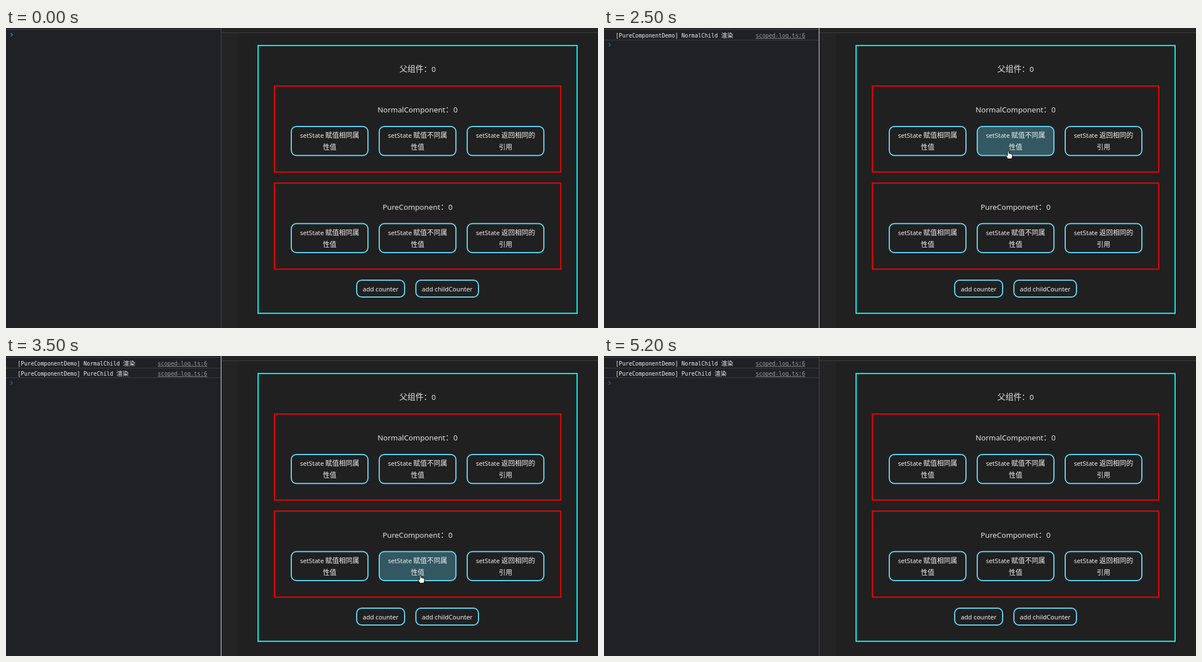
Animation, 1050 px wide and 533 px high, one loop 5300 ms. Source, as an HTML page with a canvas:

```html
<!DOCTYPE html>
<html lang="zh">
<head>
<meta charset="utf-8">
<style>
  html, body { margin: 0; overflow: hidden; background: #202020; }
  canvas { display: block; }
</style>
</head>
<body>
<canvas id="stage" width="1050" height="533"></canvas>
<script>
const ctx = document.getElementById('stage').getContext('2d');
const LOOP = 5300, STEP = 100, FADE = 500;
const SANS = '"Noto Sans", "Open Sans", sans-serif';
const CJK = '"Noto Sans CJK SC", "Noto Sans CJK", sans-serif';
const MONO = '"DejaVu Sans Mono", "Noto Sans Mono", monospace';

// Pointer stops: time, x, y, shape
const pointerStops = [
  [0, 0, 0, null],
  [800, 630, 9, 'arrow'], [900, 648, 44, 'arrow'], [1000, 669, 90, 'arrow'],
  [1100, 689, 143, 'beam'], [1200, 705, 189, 'hand'], [1300, 711, 201, 'hand'],
  [1400, 713, 198, 'hand'], [1800, 712, 197, 'hand'],
  [2500, 717, 218, 'hand'], [2600, 724, 264, 'arrow'], [2700, 731, 335, 'arrow'],
  [2800, 735, 387, 'hand'], [3000, 735, 389, 'hand'],
  [4400, 691, 308, 'beam'], [4500, 671, 164, 'arrow'], [4600, 656, 27, 'arrow'],
  [4700, 0, 0, null],
];
const labels = [
  ['setState 赋值相同属', '性值'],
  ['setState 赋值不同属', '性值'],
  ['setState 返回相同的', '引用'],
];
const logs = [[1800, 'NormalChild'], [3500, 'PureChild']];

function rect(x, y, w, h, color) {
  ctx.fillStyle = color;
  ctx.fillRect(x, y, w, h);
}

function frame(x, y, w, h, color) {
  ctx.strokeStyle = color;
  ctx.lineWidth = 2.2;
  ctx.strokeRect(x + 1.1, y + 1.1, w - 2.2, h - 2.2);
}

function text(str, x, y, font, color) {
  ctx.font = font;
  ctx.fillStyle = color;
  ctx.fillText(str, x, y);
}

// Centred line mixing Latin and Chinese runs
function centred(str, cx, y, size, color) {
  const runs = str.match(/[\x20-\x7e]+|[^\x20-\x7e]+/g).map(run => {
    const font = run.charCodeAt(0) < 127 ? `${size * 0.925}px ${SANS}` : `${size}px ${CJK}`;
    ctx.font = font;
    return { run, font, width: ctx.measureText(run).width };
  });
  let x = cx - runs.reduce((sum, r) => sum + r.width, 0) / 2;
  for (const { run, font, width } of runs) {
    text(run, x, y, font, color);
    x += width;
  }
}

function button(x, y, w, h, lines, glow = 0) {
  ctx.beginPath();
  ctx.roundRect(x + 1, y + 1, w - 2, h - 2, 9);
  ctx.fillStyle = `rgba(97, 218, 251, ${0.3 * glow})`;
  ctx.fill();
  ctx.strokeStyle = '#61dafb';
  ctx.lineWidth = 2;
  ctx.stroke();
  lines.forEach((line, i) => centred(line, x + w / 2, y + 21 + i * 21, 12, '#f2f2f2'));
}

// The CSS "ease" curve: cubic-bezier(.25, .1, .25, 1)
function ease(p) {
  if (p <= 0) return 0;
  if (p >= 1) return 1;
  const bezier = (s, a, b) => 3 * s * (1 - s) ** 2 * a + 3 * s * s * (1 - s) * b + s ** 3;
  let lo = 0, hi = 1;
  for (let i = 0; i < 20; i++) {
    const mid = (lo + hi) / 2;
    if (bezier(mid, 0.25, 0.25) < p) lo = mid; else hi = mid;
  }
  return bezier(lo, 0.1, 1);
}

const hover = (t, enter, leave) => ease((t - enter) / FADE) - ease((t - leave) / FADE);

function component(y, name, glow) {
  frame(475, y, 510, 155, '#e60303');
  centred(`${name}：0`, 730, y + 48, 14.3, '#e4e4e4');
  labels.forEach((lines, i) => button(505 + i * 156, y + 72, 138, 53.5, lines, i === 1 ? glow : 0));
}

function chevron(y, color) {
  ctx.strokeStyle = color;
  ctx.lineWidth = 1.2;
  ctx.stroke(new Path2D(`M8.5 ${y - 3}l3 3l-3 3`));
}

function consolePanel(t) {
  rect(0, 0, 381, 533, '#202124');
  rect(0, 2, 381, 1, '#484b4f');
  const shown = logs.filter(([start]) => t >= start);
  shown.forEach(([, child], i) => {
    const y = 16.5 + i * 18;
    const prefix = `[PureComponentDemo] ${child} `;
    const font = `9.73px ${MONO}`;
    text(prefix, 20.5, y, font, '#f0f0f0');
    text('渲染', 20.5 + ctx.measureText(prefix).width, y, `10.7px ${CJK}`, '#f0f0f0');
    text('scoped-log.ts:6', 269, y, font, '#989a9d');
    rect(269, y + 1.5, 88, 1, '#85878a');
    rect(0, 21 + i * 17, 381, 1, '#3c3f43');
  });
  chevron(12 + shown.length * 18, shown.length ? '#3563b8' : '#3f87d6');
}

function page(t) {
  rect(381, 0, 669, 533, '#242424');
  rect(411, 9, 639, 524, '#202020');
  rect(382, 8, 668, 1, '#3f3f3f');
  rect(381, 0, 1, 533, t >= 1500 && t < 5200 ? '#dedede' : '#48494b');
  frame(446, 30, 568, 478, '#05efef');
  centred('父组件：0', 730, 78, 14.3, '#e4e4e4');
  component(102, 'NormalComponent', hover(t, 1110, 2530));
  component(274.5, 'PureComponent', hover(t, 2735, 4390));
  button(621, 447, 87, 32, ['add counter']);
  button(726, 447, 113, 32, ['add childCounter']);
}

const shapes = {
  arrow: new Path2D('M0 0V12L2.8 9.4L4.7 13.6L6.6 12.8L4.8 8.7H8.5Z'),
  hand: new Path2D('M-1.2 1Q0 -.8 1.2 1V5Q2.4 4.2 3.4 5.4Q4.6 4.7 5.5 6Q7 5.5 7.3 7V10.5L5.8 14.5H-.8L-4 9.3Q-4 7.4 -2.4 8L-1.2 9Z'),
  beam: new Path2D('M-3 -6H-1L0 -5L1 -6H3M0 -5V5M-3 6H-1L0 5L1 6H3'),
};

function pointer(t) {
  const [, x, y, shape] = pointerStops.findLast(stop => stop[0] <= t);
  if (!shape) return;
  ctx.save();
  ctx.translate(x, y);
  if (shape === 'beam') {
    ctx.strokeStyle = '#d8d8d8';
    ctx.lineWidth = 1.2;
  } else {
    ctx.fillStyle = '#fff';
    ctx.fill(shapes[shape]);
    ctx.strokeStyle = '#000';
    ctx.lineWidth = 1;
  }
  ctx.stroke(shapes[shape]);
  ctx.restore();
}

function draw() {
  const t = Math.floor(performance.now() % LOOP / STEP) * STEP;
  consolePanel(t);
  page(t);
  pointer(t);
  requestAnimationFrame(draw);
}
draw();
</script>
</body>
</html>
```
